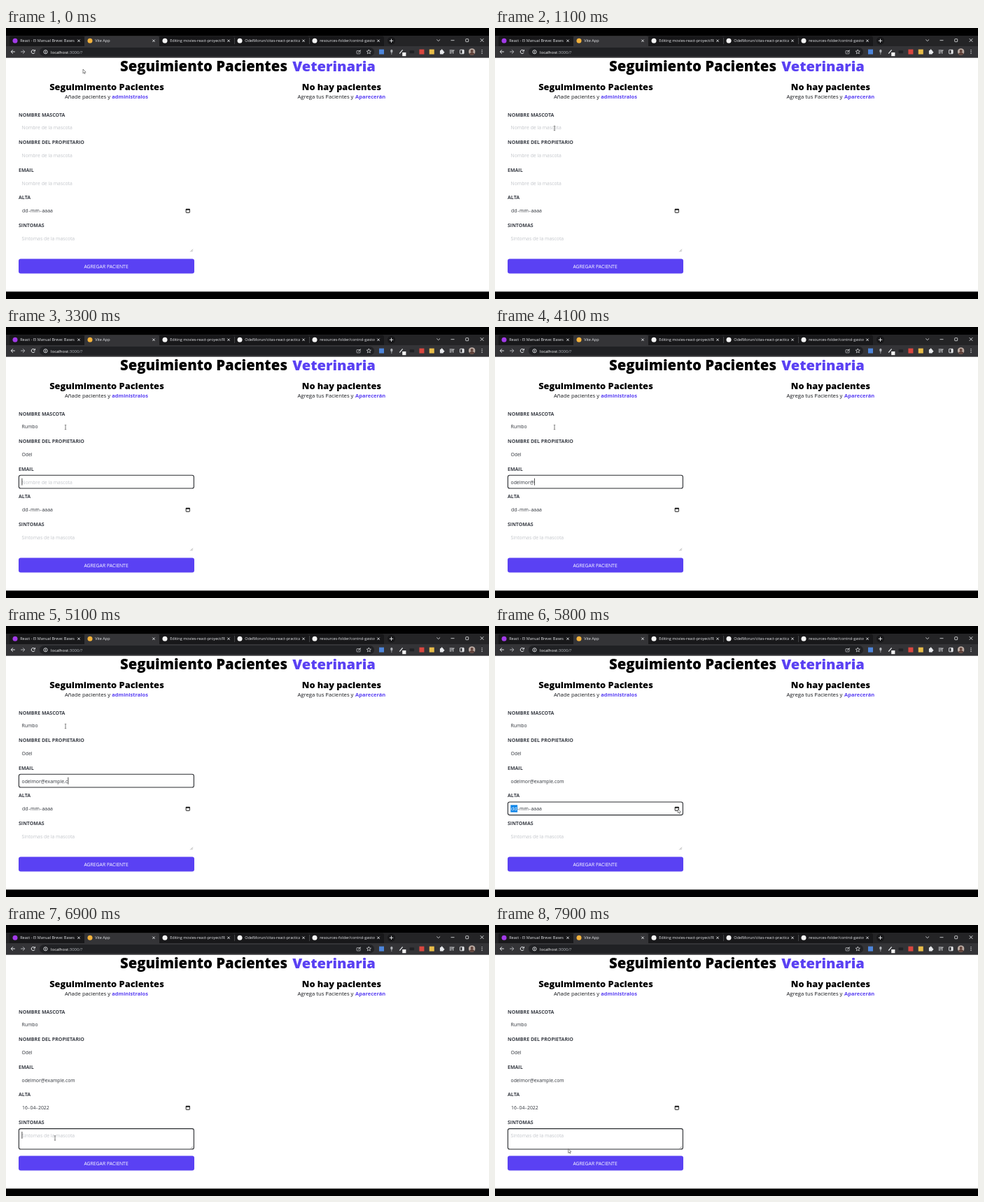
These frames come from a looping animation (690 px wide and 388 px high, 8000 ms). An HTML page with a canvas:

```html
<!DOCTYPE html>
<html lang="es">
<head>
<meta charset="utf-8">
<title>Seguimiento Pacientes</title>
<style>
html, body { margin: 0; width: 100%; height: 100%; overflow: hidden; background: #000; }
canvas { display: block; width: 690px; height: 388px; }
</style>
</head>
<body>
<canvas id="stage"></canvas>
<script>
const W = 690, H = 388, LOOP = 8000, BLINK = 330;
const canvas = document.getElementById('stage');
const ctx = canvas.getContext('2d');
const ratio = window.devicePixelRatio || 1;
canvas.width = W * ratio;
canvas.height = H * ratio;

const INDIGO = '#5a41f3', INK = '#30343b', LABEL = '#3b3f47', HINT = '#c3c6cb', ICON = '#e8eaed';
const FRAME = '#242426', TAB = '#18181a', BAR = '#343437';

const HINT_NAME = 'Nombre de la mascota';
const FIELDS = [
  { label: 'NOMBRE MASCOTA', hint: HINT_NAME, value: 'Rumbo', focus: 1135, start: 1930, step: 45 },
  { label: 'NOMBRE DEL PROPIETARIO', hint: HINT_NAME, value: 'Odel', focus: 2750, start: 2850, step: 100 },
  { label: 'EMAIL', hint: HINT_NAME, value: 'odelmor@example.com', focus: 3300, start: 3380, step: 95, pauseAt: 8, pause: 150 },
  { label: 'ALTA', focus: 5700, start: 6350 },
  { label: 'SINTOMAS', hint: 'Síntomas de la mascota', value: '', focus: 6870, height: 29.4 }
];
FIELDS.forEach((field, i) => { field.top = 132.4 + 39.65 * i; });

const MOVES = [
  { from: 0, to: 0, x: 110, y: 59 },
  { from: 100, to: 1000, x: 85, y: 143.5 },
  { from: 5150, to: 5650, x: 261.3, y: 262 },
  { from: 6350, to: 6800, x: 70, y: 305 },
  { from: 7000, to: 7800, x: 104.7, y: 320.5 }
];

function text(str, x, y, size, color, weight = 400) {
  ctx.font = `${weight} ${size}px "Open Sans", "Noto Sans", sans-serif`;
  ctx.fillStyle = color;
  ctx.fillText(str, x, y);
  return x + ctx.measureText(str).width;
}

function rect(x, y, w, h, color) {
  ctx.fillStyle = color;
  ctx.fillRect(x, y, w, h);
}

function paint(fill, stroke, width = 0.9) {
  if (fill) { ctx.fillStyle = fill; ctx.fill(); }
  if (stroke) { ctx.strokeStyle = stroke; ctx.lineWidth = width; ctx.stroke(); }
}

function rounded(x, y, w, h, r, fill, stroke, width) {
  ctx.beginPath();
  ctx.roundRect(x, y, w, h, r);
  paint(fill, stroke, width);
}

function circle(x, y, r, fill, stroke) {
  ctx.beginPath();
  ctx.arc(x, y, r, 0, Math.PI * 2);
  paint(fill, stroke);
}

function line(color, width, ...points) {
  ctx.beginPath();
  for (let i = 0; i < points.length; i += 2) ctx.lineTo(points[i], points[i + 1]);
  paint(null, color, width);
}

function clipped(shape, draw) {
  ctx.save();
  ctx.beginPath();
  shape();
  ctx.clip();
  draw();
  ctx.restore();
}

function cross(x, y, r) {
  line(ICON, 0.9, x - r, y - r, x + r, y + r);
  line(ICON, 0.9, x - r, y + r, x + r, y - r);
}

function drawTabs() {
  rect(0, 11, W, 16, FRAME);
  const names = ['React - El Manual Breve: Bases y', 'Vite App', 'Editing movies-react-proyect/RE',
    'OdelMorun/citas-react-practica', 'resources-folder/control-gastos'];
  const colors = ['#a23be8', '#f3b23c'];
  names.forEach((name, i) => {
    const x = 13 + i * 107;
    rounded(x - 8, 11.5, 107, 20, 3, i === 1 ? BAR : TAB);
    if (i > 2) rect(x - 8, 14, 0.7, 9, '#54565a');
    circle(x, 18.2, 3.5, colors[i] || '#f4f4f4');
    clipped(() => ctx.rect(x + 6, 12, 80, 14), () => text(name, x + 7.2, 20.3, 5.5, ICON));
    cross(x + 91, 18.3, 1.7);
  });
  circle(550.5, 18.3, 5.6, TAB);
  line(ICON, 0.9, 547.8, 18.3, 553.2, 18.3);
  line(ICON, 0.9, 550.5, 15.6, 550.5, 21);

  line(ICON, 0.8, 615.3, 16.5, 617.7, 18.7, 620.1, 16.5);
  line(ICON, 0.8, 635.5, 17.7, 640.5, 17.7);
  rounded(656.7, 15.7, 4, 4, 0.6, null, ICON, 0.8);
  cross(680, 17.5, 2.3);
}

function arrow(x, dir, color) {
  const y = 34, tip = x + dir * 2.8;
  line(color, 1, x - dir * 2.8, y, tip, y);
  line(color, 1, tip - dir * 2.7, y - 2.7, tip, y, tip - dir * 2.7, y + 2.7);
}

function drawNavigation() {
  arrow(10, -1, ICON);
  arrow(24, 1, '#aeb0b4');
  ctx.beginPath();
  ctx.arc(38.8, 34, 2.6, 0.4, 5.5);
  paint(null, ICON, 1);
  line(ICON, 1, 41.4, 31, 41.4, 33.2, 39.2, 33.2);

  rounded(48, 28, 478, 12.4, 6.2, '#202124');
  circle(56.5, 34.2, 2.6, null, ICON);
  rect(56.1, 32.6, 0.8, 3.2, ICON);
  const end = text('localhost', 64, 36.5, 6, '#fff');
  text(':3000/?', end, 36.5, 6, '#b4b8bd');
  rounded(501, 32.5, 5, 4.4, 0.5, null, '#b8babd', 0.8);
  line(ICON, 0.8, 503, 35, 507, 31.6);

  ctx.beginPath();
  for (let i = 0; i < 10; i++) {
    const a = Math.PI * (i / 5 - 0.5), r = i % 2 ? 1.5 : 3.3;
    ctx.lineTo(518.3 + r * Math.cos(a), 34.2 + r * Math.sin(a));
  }
  ctx.closePath();
  paint(null, ICON, 0.7);
}

function drawExtensions() {
  const square = color => x => rect(x - 3.5, 30.6, 7, 7, color);
  const icons = [
    square('#4d86dc'),
    x => { rounded(x - 1.5, 30.8, 3, 4.5, 1.5, '#aeb1b5'); rect(x - 0.4, 35, 0.8, 3, '#aeb1b5'); },
    x => { line(ICON, 1.2, x - 3, 36.7, x + 1.4, 31.4); rect(x + 1, 35, 5.2, 5.2, '#f5f5f5'); },
    x => rounded(x - 3, 32.2, 6.5, 4, 1, '#202124'),
    square('#d9473f'),
    square('#e9bd49'),
    x => { rounded(x - 2.7, 32, 5, 5.4, 0.7, ICON); circle(x, 31.8, 1.2, ICON); circle(x + 2.5, 34.7, 1.2, ICON); },
    x => { for (let i = 0; i < 3; i++) rect(x - 3.3, 31.5 + 2 * i, 5 - i, 0.9, ICON); line(ICON, 0.9, x + 1.8, 36.8, x + 1.8, 32, x + 3.6, 32); },
    x => { rounded(x - 2.7, 31.3, 5.5, 5.5, 0.5, null, ICON); rect(x + 0.3, 31.3, 2.5, 5.5, ICON); },
    x => clipped(() => ctx.arc(x, 34, 4.8, 0, Math.PI * 2), () => {
      rect(x - 5, 29, 10, 10, '#b9a9a1');
      circle(x, 33, 2, '#5e4038');
      circle(x, 39, 4, '#5e4038');
    }),
    x => { for (let i = -1; i <= 1; i++) circle(x, 34 + i * 2.4, 0.7, ICON); }
  ];
  icons.forEach((draw, i) => draw(536.5 + 14.35 * i));
}

function drawBrowser() {
  rect(0, 0, W, H, '#000');
  drawTabs();
  rect(0, 26, W, 17, BAR);
  drawNavigation();
  drawExtensions();
  rect(0, 42.7, W, 334.7, '#fff');
}

function drawPage() {
  text('Seguimiento Pacientes', 163, 62.3, 20.3, '#000', 800);
  text('Veterinaria', 409.2, 62.3, 20.2, INDIGO, 800);
  text('Seguimimento Pacientes', 62.2, 88.8, 12.8, '#000', 800);
  text('No hay pacientes', 422.8, 88.8, 12.7, '#000', 800);
  text('Añade pacientes y', 84, 100.6, 7.7, '#16181c');
  text('administralos', 151.3, 100.6, 7.5, INDIGO, 700);
  text('Agrega tus Pacientes y', 416.4, 100.6, 7.7, '#16181c');
  text('Aparecerán', 499, 100.6, 7.5, INDIGO, 700);
  rounded(18, 330.4, 251, 21.2, 3, INDIGO);
  text('AGREGAR PACIENTE', 111.4, 343.9, 6.85, '#fff', 500);
}

// Number of characters typed and the time of the latest keystroke.
function typing(field, t) {
  const { value, start, step, pauseAt = Infinity, pause = 0 } = field;
  const keyTime = i => start + i * step + (i >= pauseAt ? pause : 0);
  let count = 0;
  while (count < value.length && t >= keyTime(count)) count++;
  return { count, last: count ? keyTime(count - 1) : field.focus };
}

function drawInput(field, focused, t) {
  const { count, last } = typing(field, t);
  const y = field.top + 12.9;
  const end = text(field.value.slice(0, count) || field.hint, 22.5, y, 6.85, count ? INK : HINT);
  const lit = Math.floor((t - last) / BLINK) % 2 === 0;
  if (focused && lit) rect(count ? end + 0.3 : 22.5, y - 8, 0.8, 10, '#222');
}

function drawDate(field, focused, t) {
  const y = field.top + 12.9, filled = t >= field.start;
  const parts = filled ? ['16', '-', '04', '-', '2022'] : ['dd', '-', 'mm', '-', 'aaaa'];
  const picked = focused && !filled;
  if (picked) rect(22.3, y - 8, 9.8, 10.4, '#1387e8');
  let x = 23;
  parts.forEach((part, i) => {
    x = text(part, x, y, 6.9, picked && i === 0 ? '#fff' : INK) + 0.7;
  });
  rounded(257.2, 259.4, 5.2, 5, 0.5, null, '#111', 0.9);
  rect(256.9, 258.9, 5.8, 1.8, '#111');
}

function drawForm(t) {
  const active = FIELDS.filter(field => t >= field.focus).pop();
  for (const field of FIELDS) {
    const focused = field === active;
    text(field.label, 18, field.top - 5.9, 7, LABEL, 700);
    if (focused) rounded(18.4, field.top + 0.6, 250, field.height || 18.7, 2.6, null, '#2b2d31', 1.1);
    (field.hint ? drawInput : drawDate)(field, focused, t);
  }
  line('#777', 0.6, 263.4, 320.3, 266.9, 316.8);
  line('#777', 0.6, 265.3, 320.3, 266.9, 318.7);
}

function pointerAt(t) {
  let { x, y } = MOVES[0];
  for (const move of MOVES.slice(1)) {
    const u = Math.min(1, Math.max(0, (t - move.from) / (move.to - move.from)));
    const ease = u * u * (3 - 2 * u);
    x += (move.x - x) * ease;
    y += (move.y - y) * ease;
  }
  return { x, y };
}

function drawPointer(t) {
  const { x, y } = pointerAt(t);
  const overText = x < 255 && FIELDS.some(f => f.hint && y > f.top && y < f.top + (f.height || 19));
  if (overText) {
    line('#444', 0.7, x, y - 3, x, y + 3);
    for (const end of [-3.2, 3.2]) line('#444', 0.6, x - 1.2, y + end, x + 1.2, y + end);
    return;
  }
  ctx.beginPath();
  ctx.moveTo(x, y);
  ctx.lineTo(x, y + 6);
  ctx.lineTo(x + 1.6, y + 4.7);
  ctx.lineTo(x + 2.7, y + 6.8);
  ctx.lineTo(x + 2.6, y + 4.4);
  ctx.lineTo(x + 4.1, y + 4.2);
  ctx.closePath();
  paint('#fff', '#555', 0.7);
}

function render(now) {
  const t = now % LOOP;
  ctx.setTransform(ratio, 0, 0, ratio, 0, 0);
  drawBrowser();
  drawPage();
  drawForm(t);
  drawPointer(t);
}

const began = performance.now();
function tick() {
  render(performance.now() - began);
  requestAnimationFrame(tick);
}
tick();
</script>
</body>
</html>
```
